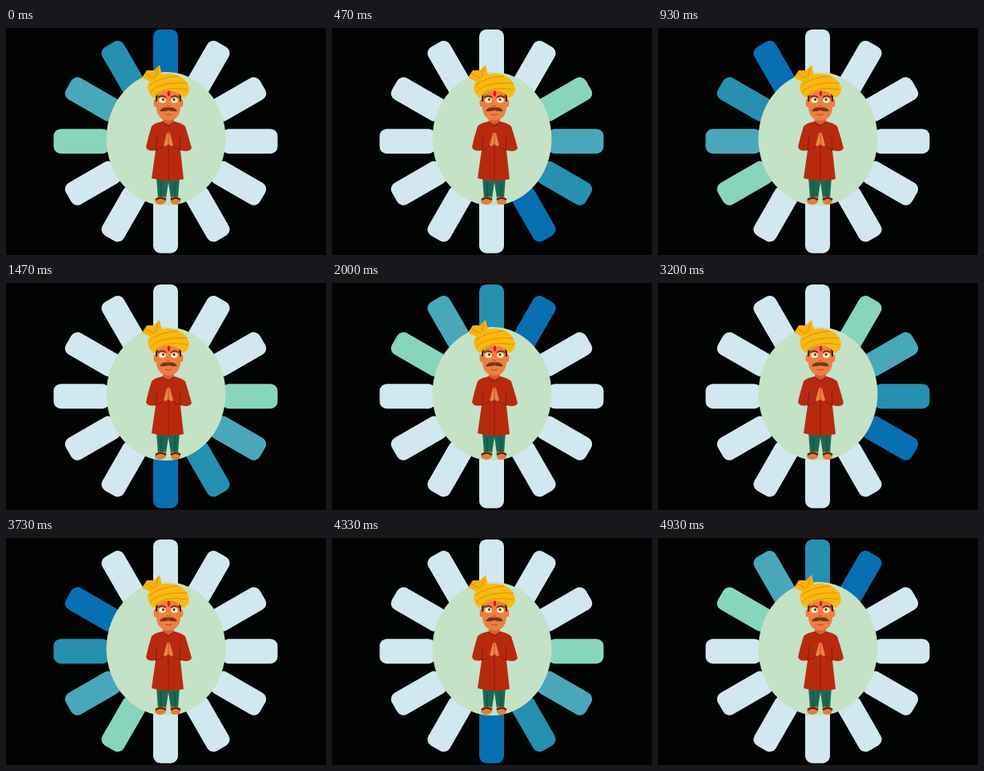
Write an HTML page that moves like this. It is 400x284 px and loops after 4990 ms.

```html
<!DOCTYPE html>
<html lang="en">
<head>
<meta charset="utf-8">
<title>Greeting spinner</title>
<style>
html, body { margin: 0; width: 100%; height: 100%; overflow: hidden; background: #020303; }
svg { display: block; width: 400px; height: 284px; }
</style>
</head>
<body>
<svg viewBox="0 0 400 284">
  <g id="spokes"></g>
  <ellipse cx="200" cy="138.5" rx="74.5" ry="83.5" fill="#c4e2c6"/>

  <!-- legs and shoes -->
  <path d="M188 186H217L215 213H206L203 193L200 213H190Z" fill="#1c6855"/>
  <path d="M194 192V211M211 192V211" stroke="#134c3e" fill="none"/>
  <path d="M190 211H199L200 217Q198 221 192 221Q186 220 186 216ZM207 211H215L218 216Q218 221 212 221Q206 221 206 217Z" fill="#e08038"/>
  <path d="M187 215Q193 210 200 215M206 215Q212 210 218 215" stroke="#55280f" stroke-width="2.5" fill="none"/>

  <!-- kurta -->
  <path d="M196 107H210V121L203 126L196 121Z" fill="#d0622d"/>
  <path d="M195 117Q185 119 182 123Q178 135 175 149Q177 155 187 153L182 188Q202 194 222 189L218 153Q230 156 232 150Q228 135 224 123Q220 119 211 117L203 121Z" fill="#b82a10"/>
  <path d="M195 117L203 123L211 117M187 153L189 135M218 153L217 135M203 147V190M187 153Q195 151 200 145M218 153Q211 151 206 145" fill="none" stroke="#841a0b"/>
  <path d="M197 147L201 132Q203 129 205 132L209 147Q206 149 203 145Q200 149 197 147Z" fill="#ea8446"/>
  <path d="M203 131V146" stroke="#aa4820" stroke-width=".8"/>

  <!-- face -->
  <g fill="#ee7e43">
    <ellipse cx="187" cy="94" rx="2.5" ry="5"/>
    <ellipse cx="219" cy="94" rx="2.5" ry="5"/>
    <path d="M188 78H218V101Q216 115 203 116Q190 115 188 101Z"/>
  </g>
  <path d="M187 82H190L189 92H187ZM219 82H216L217 92H219Z" fill="#4b2412"/>
  <g fill="#fff0cc">
    <ellipse cx="195.5" cy="90.5" rx="4.3" ry="3.2"/>
    <ellipse cx="210.5" cy="90.5" rx="4.3" ry="3.2"/>
  </g>
  <path d="M190 87Q195 83 200 87M206 87Q211 83 216 87" fill="none" stroke="#572a13" stroke-width="1.6"/>
  <g fill="#573018">
    <circle cx="196.5" cy="89.5" r="1.6"/>
    <circle cx="210" cy="89.5" r="1.6"/>
    <path d="M192 104Q195 98 203 99.5Q211 98 214 104Q208 105 203 103Q198 105 192 104Z" fill="#723813"/>
  </g>
  <path d="M201 97Q203 99 205 97M199 108Q203 110 207 108" fill="none" stroke="#b54920"/>
  <ellipse cx="203.5" cy="82" rx="1.7" ry="3.4" fill="#e0180e"/>

  <!-- turban -->
  <path d="M182 68L170 62L176 53L185 53L192 46L195 59Z" fill="#f8b30c"/>
  <path d="M177 74Q180 58 203 57Q225 58 229 76Q229 84 221 88Q216 79 203 78Q192 79 185 88Q178 83 177 74Z" fill="#fbb90d"/>
  <path d="M180 81Q190 67 227 69M179 72Q190 62 215 60M186 84Q199 72 227 77M174 57L186 64M190 50L187 62" fill="none" stroke="#d48b08" stroke-width=".9"/>
</svg>
<script>
const LOOP = 4990, FRAME = 200 / 3, COUNT = 12;
const TAIL = ['#0870b0', '#2690b0', '#48a8ba', '#88d5be'];
const IDLE = '#d2e8f0';

const group = document.getElementById('spokes');
const spokes = Array.from({ length: COUNT }, (_, i) => {
  const bar = document.createElementNS(group.namespaceURI, 'rect');
  const attrs = { x: -15.5, y: -140, width: 31, height: 70, rx: 9,
    transform: `translate(199.5 141.7) rotate(${i * 360 / COUNT})` };
  for (const key in attrs) bar.setAttribute(key, attrs[key]);
  return group.appendChild(bar);
});

function draw() {
  // The head advances every 80 ms, sampled at 15 frames per second.
  const time = (performance.now() - start) % LOOP;
  const frame = Math.floor((time + 4) / FRAME);
  const head = Math.floor(frame * 5 / 6);
  spokes.forEach((bar, i) => {
    const age = (head - i + COUNT) % COUNT;
    bar.setAttribute('fill', TAIL[age] || IDLE);
  });
  requestAnimationFrame(draw);
}

const start = performance.now();
draw();
</script>
</body>
</html>
```
